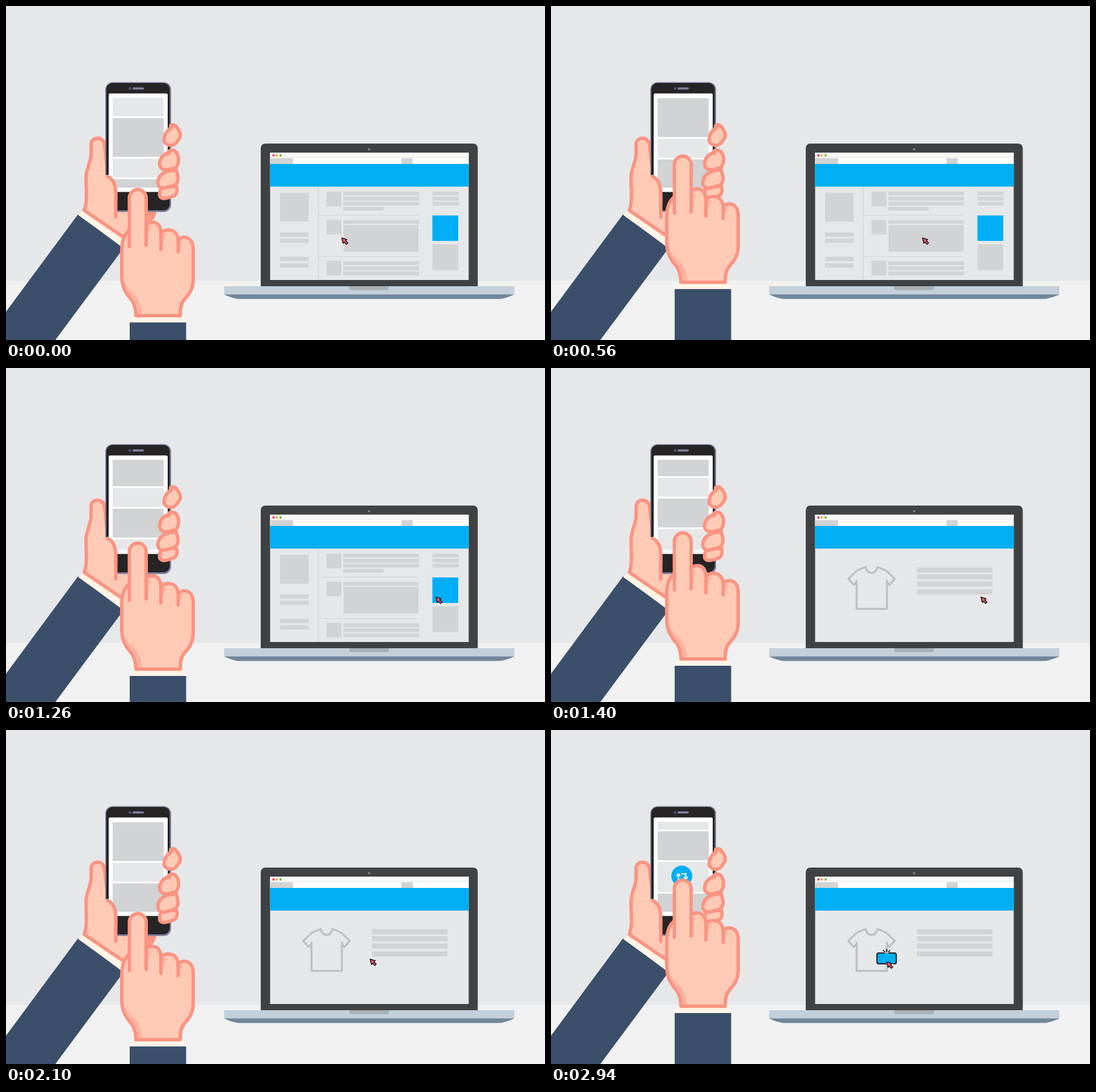
Animation, 950 px wide and 590 px high, one loop 3.44 s. Source, as an HTML page:

```html
<!DOCTYPE html>
<html lang="en">
<head>
<meta charset="utf-8">
<title>Phone and laptop</title>
<style>
  html, body { margin: 0; width: 100%; height: 100%; overflow: hidden; background: #e6e7e9; }
  svg { display: block; width: 100vw; height: 100vh; }
  .skin { fill: #ffcab5; }
  .edge { stroke: #fa9482; stroke-width: 6; stroke-linecap: round; stroke-linejoin: round; }
  .line { fill: none; }
  .shade { fill: #fcb19e; }
  .suit { fill: #3b4f6b; }
  .cuff { fill: #fff4e6; }
  .dark { fill: #d1d3d4; }
  .light { fill: #e6e7e8; }
  .blue { fill: #00aef3; }
  .white { fill: none; stroke: #fff; stroke-width: 2; }
  .ink { fill: none; stroke: #111; stroke-width: 2; stroke-linecap: round; }
</style>
</head>
<body>
<svg viewBox="0 0 950 590">
  <defs>
    <clipPath id="feedClip"><rect x="188" y="162" width="90" height="159"/></clipPath>
    <linearGradient id="bar" x2="0" y2="1">
      <stop offset="0" stop-color="#fff"/><stop offset="1" stop-color="#f2f1ed"/>
    </linearGradient>
  </defs>
  <rect width="950" height="590" fill="#e6e7e9"/>
  <rect y="485.5" width="950" height="105" fill="#f1f1f1"/>

  <g id="laptop">
    <path d="M449 495V252Q449 243 458 243H822.500Q831.500 243 831.500 252V495Z" fill="#404143"/>
    <circle cx="640" cy="253" r="2" fill="#85878a"/>
    <rect x="465.500" y="259" width="350" height="225" class="light"/>
    <rect x="465.500" y="259" width="350" height="10" fill="url(#bar)"/>
    <circle cx="471.500" cy="264" r="1.900" fill="#e8114b"/>
    <circle cx="477.500" cy="264" r="1.900" fill="#f6a11c"/>
    <circle cx="484" cy="264" r="1.900" fill="#55b430"/>
    <rect x="465.500" y="269" width="350" height="10" fill="#fff"/>
    <rect x="465.500" y="269" width="40.500" height="10" class="dark"/>
    <rect x="697" y="269" width="20" height="10" class="dark"/>
    <rect x="465.500" y="279" width="350" height="40" class="blue"/>
    <path d="M384.500 495H896V510H384.500Z" fill="#c3d0da"/>
    <path d="M384.500 509.500H896Q885 515 872 517.500H408Q395 515 384.500 509.500Z" fill="#71869a"/>
    <path d="M605 495H675V498Q675 502 671 502H609Q605 502 605 498Z" fill="#a9b0b6"/>
  </g>

  <g id="feedPage">
    <path d="M550.500 319V484M550 369.500H728M550 442.500H728" fill="none" stroke="#d1d3d4"/>
    <rect x="751.500" y="370" width="45.500" height="45" class="blue"/>
  </g>
  <g id="shopPage">
    <path d="M538.500 374V425.500H592V374M538.500 378L533.500 383L524 372.500L538 359Q540 357 554.500 351.500Q557 362 565 362Q573 362 575.500 351.500Q590 357 592 359L606 372.500L596.500 383L592 378"
      fill="none" stroke="#bdbfc0" stroke-width="3.400" stroke-linejoin="round"/>
  </g>
  <g id="button">
    <rect x="574.500" y="394" width="34" height="19" rx="3" class="blue"/>
    <path class="ink" d="M587 394H577.500Q574.500 394 574.500 397V410Q574.500 413 577.500 413H590M596 394H605.500Q608.500 394 608.500 397V410Q608.500 413 605.500 413H604"/>
    <path class="ink" stroke-width="1.500" d="M586 389.500L588 392M591.500 387.500V391.500M597 389.500L595 392"/>
  </g>
  <path id="cursor" d="M.8 .8L9.800 3.500L7.500 5.600L11.500 9.500L9 12L5 8L3.200 10.200Z"
    fill="#f25a6c" stroke="#1a1415" stroke-width="1.500" stroke-linejoin="round"/>

  <g id="holder">
    <path class="suit" d="M127 368L207 428L87 590H0V540Z"/>
    <path class="cuff" d="M136 361L215 416L208 427.500L127.500 369.500Z"/>
    <path class="skin edge" d="M138 361C144 345 141 325 141 302C142 286 150 274 150 262V244C151 230 171 230 173.500 244L180 300L262 364Q260 374 256 376L214 413Z"/>
    <path fill="#fa9482" d="M243 360H263Q262 374 254 380Z"/>
  </g>

  <g id="phone">
    <rect x="175" y="134.500" width="116" height="229.500" rx="13" fill="#8281a0"/>
    <rect x="176.700" y="136" width="112" height="225" rx="11.500" fill="#262425"/>
    <rect x="181" y="154.500" width="104" height="174" rx="2.500" fill="#fff"/>
    <circle cx="218.500" cy="145.700" r="1.700" fill="none" stroke="#8b8aa5"/>
    <rect x="223" y="143.800" width="20" height="3.700" rx="1.850" fill="#8281a0"/>
    <g clip-path="url(#feedClip)"><g id="feed"></g></g>
  </g>

  <g id="grip">
    <path class="skin" d="M150 295L177 299Q187 302 192 315Q196 328 195 350L193 373L160 372Z"/>
    <path class="edge line" d="M179 301Q188 305 191.500 316Q194.500 328 193.500 348V373"/>
    <path class="skin edge" d="M277 318Q269 326 271 336Q275 342 285 339L297 335Q303 331 301 319Z"/>
    <path class="skin edge" d="M283 292Q268 299 267.500 312Q269 325 282 321L297 317Q305 311 303 301L300 289Z"/>
    <path class="skin edge" d="M284 260Q272 265 270.500 279Q272 291 286 289L299 286Q306 278 303.500 265Q299 252 289 255Z"/>
    <path class="skin edge" d="M291 216Q279 222 278.500 238Q282 247 293 246Q300 245 307 231Q309 224 300 213Q296 208 291 211Z"/>
    <path fill="#fa9482" d="M288 208H299L292 219L285 221ZM285 254H293L290 263L283 264Z"/>
  </g>

  <g id="icon">
    <circle id="disc" r="18.500"/>
    <g id="like" fill="#fff">
      <rect x="-9.800" y="-2" width="5" height="11.500"/>
      <path d="M-3.500 -2L1 -9Q1.500 -12 3.500 -11.500Q6 -10 4 -3H9Q11.500 -2.500 10.500 0Q11.500 2 10 3.500Q10.500 6 8.500 7Q8 9.500 6 9.500H-1L-3.500 8Z"/>
    </g>
    <path id="heart" fill="#fff" d="M0 11C-6 6 -11.500 1 -11.500 -4C-11 -11 -3 -12 0 -5.500C3 -12 11 -11 11.500 -4C11.500 1 6 6 0 11Z"/>
    <g id="repeat" class="white">
      <path d="M-6 -3V6H2M-9.500 0L-6 -4L-2.500 0M-1 -4H7V5M3.500 1.500L7 5.500L10.500 1.500"/>
    </g>
  </g>

  <g id="hand">
    <rect x="218" y="559" width="99.500" height="120" rx="1" class="suit"/>
    <path class="cuff" d="M222 548H314L317 558.500H218.500Z"/>
    <path class="skin edge" d="M229 547C229 535 227 528 222 520C209 505 204 495 204 475V436C204 416 207 405 217.500 396V339A14.750 14.750 0 0 1 247 339V387C252 380 272 377 273 401C278 394 302 390 303.500 414C309 405 330 405 330 430V482C330 501 322 510 314 519C308 526 307 535 307 547Z"/>
    <path class="shade" d="M207 484Q213 500 227 510Q236 519 240 544H232Q232 530 226 520Q210 503 207 484ZM250 390H256Q250 402 249 424ZM276 402H284Q276 414 275 431ZM306 415H313Q306 424 305 435Z"/>
    <path class="edge line" d="M217.500 396V425M247 387V423M273 401V430M303.500 414V434"/>
  </g>
</svg>
<script>
const STEP = 140, LAST = 21, LOOP = 3440;
const $ = id => document.getElementById(id);

function rect(parent, kind, x, y, w, h) {
  const r = document.createElementNS("http://www.w3.org/2000/svg", "rect");
  Object.entries({ class: kind, x, y, width: w, height: h })
    .forEach(([key, value]) => r.setAttribute(key, value));
  $(parent).append(r);
}
const bars = (parent, x, w, h, ...tops) => tops.forEach(y => rect(parent, "dark", x, y, w, h));

// Laptop pages
bars("feedPage", 483, 50.5, 51, 330);
bars("feedPage", 483, 50.5, 7.5, 400, 411, 443, 454.5);
bars("feedPage", 565, 26, 26, 328, 377.5, 450);
bars("feedPage", 594.5, 133.5, 6.5, 328, 337, 346, 378, 451, 460, 469);
bars("feedPage", 594.5, 71, 6.5, 355);
bars("feedPage", 595, 132, 47, 387);
bars("feedPage", 752, 46, 6.5, 328, 337, 346);
bars("feedPage", 751.5, 45.5, 45.5, 421);
bars("shopPage", 645, 133, 9, 352, 364.3, 377, 391);

// Phone feed: alternating cards
let top0 = 161;
[34, 68.5, 33.5, 51, 53, 70].forEach((h, i) => {
  rect("feed", i % 2 ? "dark" : "light", 188, top0, 90, h);
  top0 += h + 3;
});

// One entry per step
const swipe = [0, -15, -33, -46, -59, -59, -59];
const lift = [...swipe, -59, ...swipe, ...swipe];
const later = [35, 57.5, 75.5, 91, 127, 127, 127];
const scroll = [0, 8.5, 17.5, 26, 35, 35, 35, 35, ...later, ...later];
const cursorX = [591, 608, 620, 635, 654, 670, 689, 708, 727, 757, 757,
  734, 711, 688, 666, 641, 616, 599.5, 599.5, 595, 591, 591];
const cursorY = k => k < 8 || k > 19 ? 409 : k === 8 || k === 19 ? 406.5 : 404;

const icons = [
  { id: "like", from: 5, x: 230.3, y: 250, fill: "#0b69c7", radii: [10.5, 14, 16] },
  { id: "heart", from: 12, x: 231, y: 258, fill: "#f99fb6", radii: [11, 16, 18.5] },
  { id: "repeat", from: 19, x: 230.5, y: 258, fill: "#00aef3", radii: [11, 16, 18.5] }
];

const move = (id, x, y, s = 1) => $(id).setAttribute("transform", `translate(${x} ${y}) scale(${s})`);
const show = (id, on) => $(id).style.display = on ? "" : "none";

function draw(k) {
  move("hand", 0, lift[k]);
  move("feed", 0, -scroll[k]);
  move("cursor", cursorX[k], cursorY(k));
  show("feedPage", k < 10);
  show("shopPage", k >= 10);
  show("button", k === LAST);

  const now = icons.find(i => k >= i.from && k < i.from + 3);
  show("icon", now);
  icons.forEach(i => show(i.id, i === now));
  if (now) {
    move("icon", now.x, now.y, now.radii[k - now.from] / 18.5);
    $("disc").setAttribute("fill", now.fill);
  }
}

const start = performance.now();
let shown = -1;
function tick() {
  const t = (performance.now() - start) % LOOP;
  const k = Math.min(LAST, Math.floor(t / STEP));
  if (k !== shown) draw(shown = k);
  requestAnimationFrame(tick);
}
tick();
</script>
</body>
</html>
```
